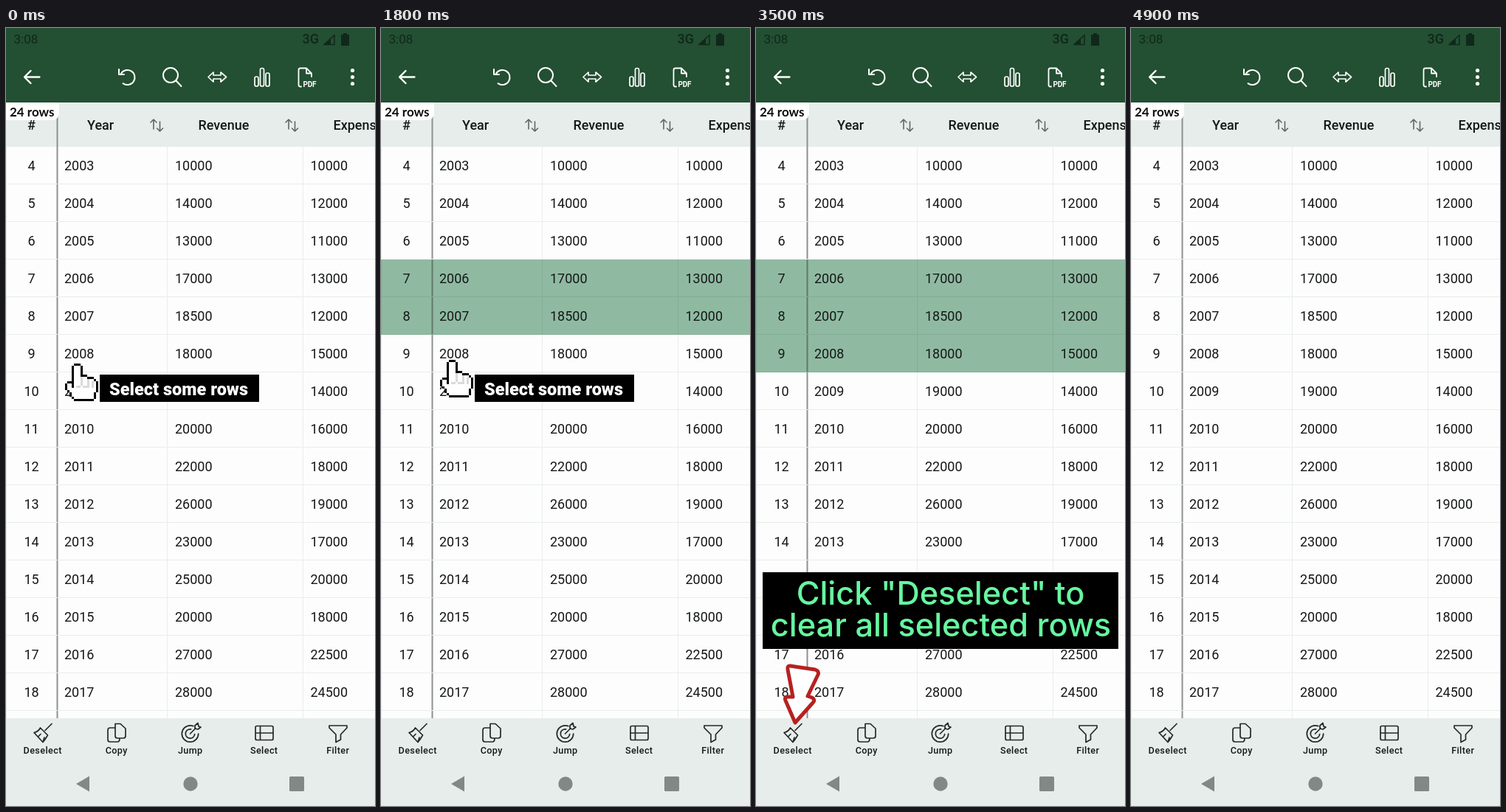
An HTML page with a canvas for the animation above (5 s loop, 500 px wide and 1055 px high).

```html
<!DOCTYPE html>
<html lang="en">
<head>
<meta charset="utf-8">
<title>Deselect rows</title>
<style>
html, body { margin: 0; width: 100%; height: 100%; overflow: hidden; background: #e6edea; }
canvas { display: block; width: 500px; height: 1055px; }
</style>
</head>
<body>
<canvas id="stage"></canvas>
<script>
const W = 500, H = 1055, LOOP = 5000;
const canvas = document.getElementById('stage');
const c = canvas.getContext('2d');
const dpr = window.devicePixelRatio || 1;
canvas.width = W * dpr;
canvas.height = H * dpr;

const PALE = '#e6edea', DARK = '#234f32', PAPER = '#fcfdfc', INK = '#161818';
const GRID = '#e9eeeb', PICKED = '#8fbaa1', PICKED_GRID = '#83ae95';
const ROBOTO = 'Roboto, sans-serif';
const TOP = 161, ROW = 51, FOOT = 936;
const columns = [0, 218, 402];
const revenue = [10000, 14000, 13000, 17000, 18500, 18000, 19000, 20000, 22000, 26000, 23000, 25000, 20000, 27000, 28000];
const expense = [10000, 12000, 11000, 13000, 12000, 15000, 14000, 16000, 18000, 19000, 17000, 20000, 18000, 22500, 24500];

// Row index and the time it becomes selected
const picks = [[3, 700], [4, 1400], [5, 2100]];
const CLEAR = 4400, CAPTION_IN = 3000, CAPTION_OUT = 4600;
const touches = [
  { from: 700, to: 1000, x: 279, y: 338 },
  { from: 1400, to: 1700, x: 279, y: 390 },
  { from: 2100, to: 2400, x: 279, y: 441 },
  { from: 4100, to: 4400, x: 47, y: 973 }
];

function rect(x, y, w, h, color) {
  c.fillStyle = color;
  c.fillRect(x, y, w, h);
}

function text(s, x, y, font, color, align = 'left', spacing = 0) {
  c.font = font;
  c.fillStyle = color;
  c.textAlign = align;
  c.letterSpacing = spacing + 'px';
  c.fillText(s, x, y);
}

function line(d, color, width) {
  c.strokeStyle = color;
  c.lineWidth = width;
  c.lineCap = c.lineJoin = 'round';
  c.stroke(new Path2D(d));
}

function shape(d, color) {
  c.fillStyle = color;
  c.fill(new Path2D(d));
}

function disc(x, y, r, color) {
  c.fillStyle = color;
  c.beginPath();
  c.arc(x, y, r, 0, Math.PI * 2);
  c.fill();
}

function ring(x, y, r, color, width, from = 0, to = Math.PI * 2) {
  c.strokeStyle = color;
  c.lineWidth = width;
  c.beginPath();
  c.arc(x, y, r, from, to);
  c.stroke();
}

function toolbar() {
  const white = '#fff', dim = '#10281b';
  rect(0, 0, W, 101, DARK);
  text('3:08', 10.5, 21, '17px ' + ROBOTO, dim);
  text('3G', 401.5, 21, '500 18px ' + ROBOTO, dim);
  line('M445 9.5V22.5H431Z', dim, 1.4);
  shape('M440 14V23H430Z', dim);
  shape('M457 7h5v2h3v15h-11v-15h3z', dim);

  line('M45.5 66.5H25.5M33.5 58L25 66.5L33.5 75', white, 2.3);
  ring(164.5, 67, 10, white, 2, -2.6, 2.2);
  line('M153 56V63H160', white, 2);
  ring(223, 64, 10, white, 2);
  line('M230.5 71.5L237.5 79', white, 2);
  line('M274 66.5L281 60V64H291V60L298.5 66.5L291 73V69H281V73Z', white, 1.7);
  c.strokeStyle = white;
  c.lineWidth = 1.7;
  for (const [x, y] of [[337, 66], [344.5, 54.5], [352, 61]]) {
    c.beginPath();
    c.roundRect(x, y, 5, 79 - y, 2.3);
    c.stroke();
  }
  line('M400 79.5H399Q396.5 79.5 396.5 77V57Q396.5 54.5 399 54.5H407L414 61.5V66M407 54.5V61.5H414', white, 1.8);
  text('PDF', 402.5, 79.5, '700 10px ' + ROBOTO, white, 'left', -0.2);
  for (const y of [57.5, 66.5, 75.5]) disc(469.5, y, 2.6, white);
}

function sortIcon(x) {
  line(`M${x - 4} 137V124M${x - 8} 128L${x - 4} 124L${x} 128M${x + 4.5} 127V140M${x + 0.5} 136L${x + 4.5} 140L${x + 8.5} 136`, '#616765', 1.6);
}

function isPicked(i, t) {
  return picks.some(([row, at]) => row === i && t >= at && t < CLEAR);
}

function table(t) {
  rect(0, 101, W, 60, PALE);
  rect(0, TOP, W, FOOT - TOP, PAPER);
  rect(68.5, 120, 2, FOOT - 120, '#8c918e');
  const font = '18px ' + ROBOTO;
  revenue.forEach((value, i) => {
    const y = TOP + ROW * i, base = y + 32, picked = isPicked(i, t);
    const grid = picked ? PICKED_GRID : GRID;
    if (picked) {
      rect(0, y, W, ROW, PICKED);
      rect(68.5, y, 2, ROW, '#61796b');
    }
    rect(0, y + ROW - 1, W, 1, grid);
    for (const x of columns) rect(x, y, 1, ROW, grid);
    text(i + 4, 34.5, base, font, INK, 'center');
    text(2003 + i, 79, base, font, INK);
    text(value, 229, base, font, INK);
    text(expense[i], 412.5, base, font, INK);
  });
  for (const x of columns) rect(x, 926, 1, 10, GRID);

  const head = '500 18px ' + ROBOTO;
  text('#', 34.5, 138, head, INK, 'center');
  text('Year', 110, 138, head, INK);
  text('Revenue', 260.5, 138, head, INK);
  text('Expense', 443.5, 138, head, INK);
  sortIcon(204);
  sortIcon(387);

  c.fillStyle = '#fdfefd';
  c.beginPath();
  c.roundRect(0, 101, 72, 24, [0, 0, 9, 0]);
  c.fill();
  text('24 rows', 5, 120, '700 17px Lato, sans-serif', '#0c0e0d');
}

function footer() {
  rect(0, FOOT, W, H - FOOT, PALE);
  const ink = '#242827', w = 1.7;
  ['Deselect', 'Copy', 'Jump', 'Select', 'Filter'].forEach((s, i) => {
    text(s, 49.7 + i * 100, 984, '500 12.6px ' + ROBOTO, INK, 'center', 0.4);
  });
  line('M62 943.5L53 952.5M46.5 949L56.5 959M46.5 949Q44 954 38 955.5L50 968.5Q53 965 56.5 959M43.5 961L47 957.5M50 968.5L52 962', ink, w);
  line('M148 943.5H155L162 950V960Q162 963 159 963H151Q148 963 148 960ZM148 949H141Q138 949 138 952V965Q138 968 141 968H151Q154 968 154 963', ink, w);
  ring(249.5, 957, 11.2, ink, w, 0, 5.1);
  ring(249.5, 957, 6.2, ink, w, 0.1, 4.9);
  line('M249.5 957L257 949.5M256 950V946L260 942.5L261 947L264 948L260 951Z', ink, w);
  line('M340 946.5H360Q362 946.5 362 948.5V963.5Q362 965.5 360 965.5H340Q338 965.5 338 963.5V948.5Q338 946.5 340 946.5ZM344.5 946.5V965.5M338 956H362', ink, w);
  line('M438 946H462V949L453.5 958V965L447 968.5V958L438 949Z', ink, w);

  const nav = '#818885';
  shape('M95 1025L113 1014.5V1035.5Z', nav);
  disc(250, 1025, 9.7, nav);
  c.fillStyle = nav;
  c.beginPath();
  c.roundRect(384, 1015, 20, 20, 1.5);
  c.fill();
}

// White spans [x, y, width, height] in sprite cells; the outline is grown around them
const palm = [
  [4, 1, 3, 5], [4, 6, 6, 1], [4, 7, 9, 1], [4, 8, 10, 4], [1, 9, 2, 3],
  [3, 11, 11, 2], [2, 12, 12, 1], [3, 13, 10, 2], [4, 15, 9, 1]
];
const creases = [[7, 6, 1, 4], [10, 7, 1, 4], [12, 8, 1, 3], [8, 10, 2, 1], [5, 10, 2, 1]];

function hand(x, y) {
  const u = 3, cell = (px, py, w, h, color) => rect(x + px * u, y + py * u, w * u, h * u, color);
  for (const [px, py, w, h] of palm) {
    cell(px - 1, py, w + 2, h, '#000');
    cell(px, py - 1, w, h + 2, '#000');
  }
  for (const p of palm) cell(...p, '#fff');
  for (const p of creases) cell(...p, '#d9dbd9');
}

function hint(t) {
  hand(80, t % 400 < 200 ? 455 : 450);
  rect(127, 470, 216, 37, '#000');
  text('Select some rows', 234, 497.5, '800 23.5px ' + ROBOTO, '#fff', 'center');
}

function caption() {
  rect(9, 738, 482, 104, '#000');
  const font = '500 43.3px Inter, sans-serif', mint = '#66f7a0';
  text('Click "Deselect" to', 250, 782, font, mint, 'center');
  text('clear all selected rows', 250.5, 825, font, mint, 'center');
  const arrow = 'M46 865L80 870Q86 872 84 877L70 906L76 908Q81 911 77 915L53 942L40 912Q38 907 43 907L50 907L43 870Q42 865 46 865Z';
  shape(arrow, '#fff');
  line(arrow, '#b52220', 5);
}

function touch({ x, y }) {
  const onBar = y > FOOT;
  disc(x, y, 16, onBar ? 'rgba(160,165,163,.3)' : 'rgba(165,205,205,.45)');
  disc(x, y, 13.3, onBar ? 'rgba(238,240,239,.75)' : 'rgba(215,232,223,.88)');
  if (onBar) ring(x, y, 14, 'rgba(150,155,152,.5)', 1);
}

function draw(t) {
  c.setTransform(dpr, 0, 0, dpr, 0, 0);
  table(t);
  toolbar();
  footer();
  if (t < CAPTION_IN) hint(t);
  else if (t < CAPTION_OUT) caption();
  for (const p of touches) if (t >= p.from && t < p.to) touch(p);
}

function tick() {
  draw(performance.now() % LOOP);
  requestAnimationFrame(tick);
}
tick();
</script>
</body>
</html>
```
